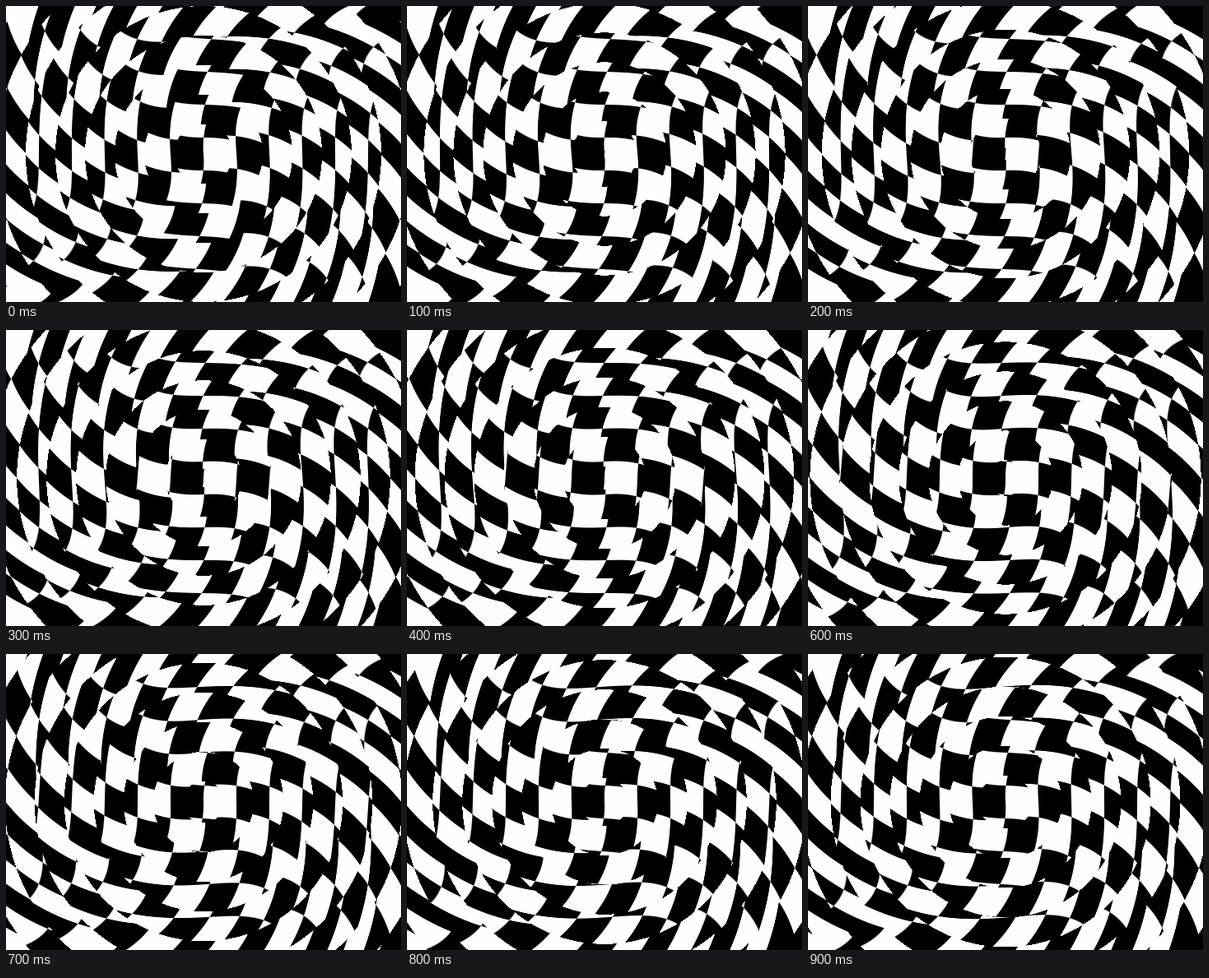
These frames come from a looping animation (480 px wide and 360 px high, 1 s). An HTML page with a canvas:

```html
<!DOCTYPE html>
<html lang="en">
<head>
<meta charset="utf-8">
<title>Twisted checkerboard</title>
<style>
  html, body { margin: 0; width: 100%; height: 100%; overflow: hidden; background: #000; }
  canvas { display: block; width: 480px; height: 360px; }
</style>
</head>
<body>
<canvas id="stage" width="480" height="360"></canvas>
<script>
const W = 480, H = 360, CELL = 40;
const RING = 36;             // width of each twisted ring
const TWIST = Math.PI / 18;  // total turn across one ring
const STEPS = 10, LOOP = 1000;

const ctx = document.getElementById('stage').getContext('2d');
const image = ctx.createImageData(W, H);
const pixels = new Uint32Array(image.data.buffer);

const clamp = (v, limit) => Math.min(Math.max(v, -limit), limit);

// Square wave between -1 and 1 whose edges are one pixel soft.
const stripe = v => clamp(Math.sin(Math.PI * v / CELL) * 2 * CELL / Math.PI, 1);

// Rings travel outwards; inside each one the board turns from -TWIST/2 to +TWIST/2.
function draw(phase) {
  for (let py = 0, i = 0; py < H; py++) {
    for (let px = 0; px < W; px++, i++) {
      const x = px + 0.5 - W / 2, y = py + 0.5 - H / 2;
      const ring = Math.sqrt(x * x + y * y) / RING - phase;
      const angle = TWIST * (ring - Math.floor(ring) - 0.5);
      const c = Math.cos(angle), s = Math.sin(angle);
      const u = clamp(x * c + y * s, W / 2 - 1);
      const v = clamp(y * c - x * s, H / 2 - 1);
      const grey = Math.round(127 * (1 + stripe(u) * stripe(v + CELL / 2)));
      pixels[i] = 0xff000000 | grey * 0x010101;
    }
  }
  ctx.putImageData(image, 0, 0);
}

let shown = -1;
function tick() {
  const step = Math.floor(performance.now() % LOOP / LOOP * STEPS);
  if (step !== shown) draw((shown = step) / STEPS);
  requestAnimationFrame(tick);
}
tick();
</script>
</body>
</html>
```
